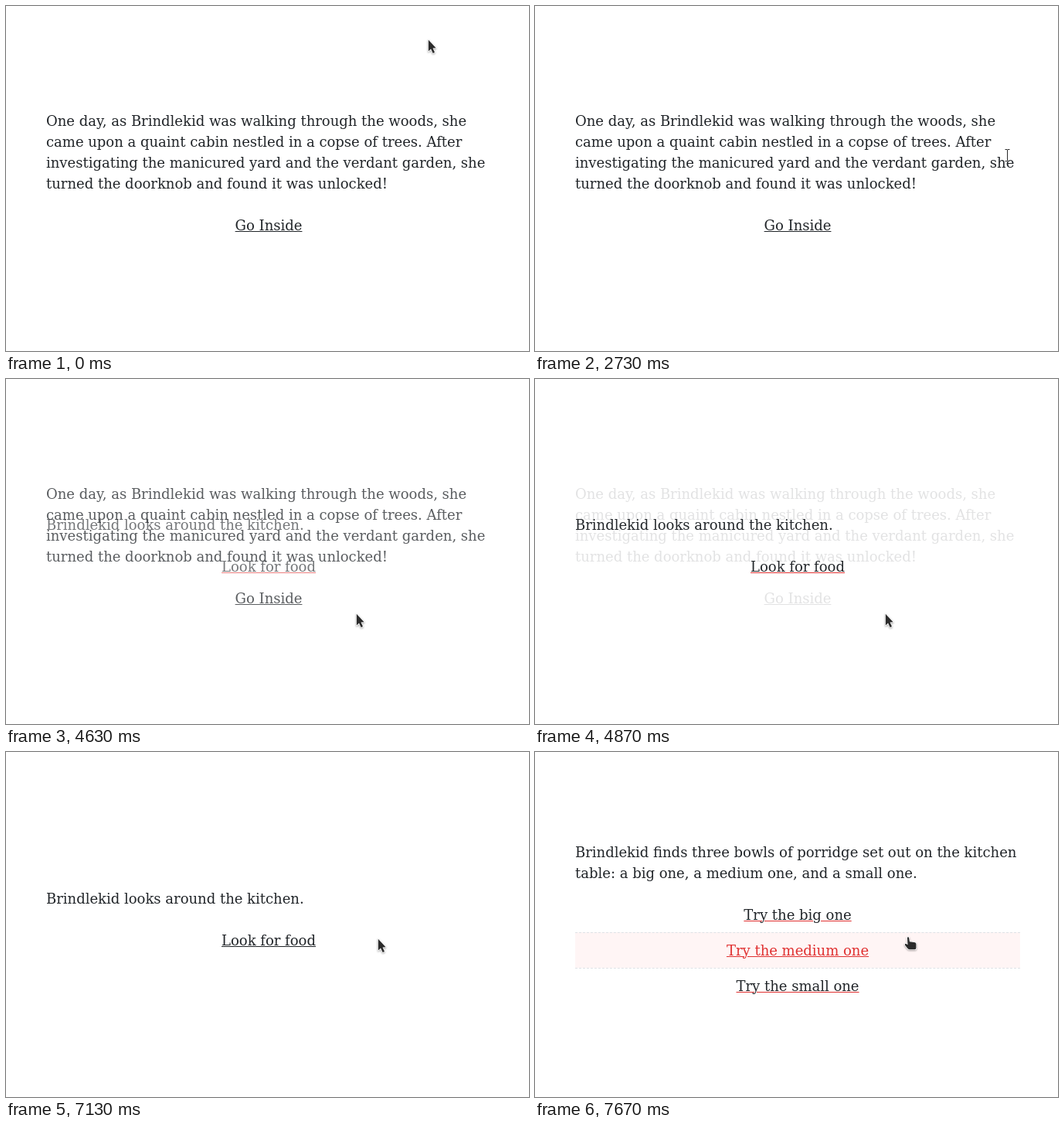
These frames come from a looping animation (677 by 446 pixels, 8000 ms). An HTML page:

```html
<!DOCTYPE html>
<html lang="en">
<head>
<meta charset="utf-8">
<title>Brindlekid</title>
<style>
  html, body { margin: 0; width: 100%; height: 100%; overflow: hidden; background: #fff; }
  body { position: relative; font: 18px/27px "DejaVu Serif", serif; color: #212529; cursor: none; }
  .page { position: absolute; left: 52px; width: 576px; white-space: pre; }
  .page p { margin: 0 0 18px; }
  .link { padding: 9px 0; text-align: center; }
  .link + .link { border-top: 1px dashed #dee2e6; }
  .link span { text-decoration: underline 1px #e03131; }
  #door { top: 135px; }
  #kitchen { top: 175px; opacity: 0; }
  #bowls { top: 116px; opacity: 0; }
  #mouse { position: absolute; left: 0; top: 0; width: 1px; height: 1px; }
  #mouse svg { position: absolute; left: -20px; top: -20px; width: 50px; height: 50px; }
  #arrow, #hand { filter: drop-shadow(0 1px 1px rgba(0, 0, 0, .35)); }
  #mouse path { fill: #2b2b2b; stroke: #fff; stroke-width: 1.6; paint-order: stroke; stroke-linejoin: round; }
</style>
</head>
<body>
<div class="page" id="door"><p>One day, as Brindlekid was walking through the woods, she
came upon a quaint cabin nestled in a copse of trees. After
investigating the manicured yard and the verdant garden, she
turned the doorknob and found it was unlocked!</p><div class="link" id="inside"><span>Go Inside</span></div></div>

<div class="page" id="kitchen"><p>Brindlekid looks around the kitchen.</p><div class="link" id="food"><span>Look for food</span></div></div>

<div class="page" id="bowls"><p>Brindlekid finds three bowls of porridge set out on the kitchen
table: a big one, a medium one, and a small one.</p><div class="link"><span>Try the big one</span></div><div class="link" id="medium"><span>Try the medium one</span></div><div class="link"><span>Try the small one</span></div></div>

<div id="mouse">
  <svg id="arrow" viewBox="-20 -20 50 50"><path d="M.8 .8V15.6L4 12.6L6.6 18L9 16.9L6.5 11.6L10.6 11.2Z"/></svg>
  <svg id="beam" viewBox="-20 -20 50 50"><path style="stroke-width:1" d="M-2.5 -8H0V-7.5H1V-8H3.5V-7H1V7H3.5V8H1V7.5H0V8H-2.5V7H0V-7H-2.5Z"/></svg>
  <svg id="hand" viewBox="-20 -20 50 50"><path d="M.9 -1.2Q2 -2.2 3 -1.2L3.9 4.2L9.6 5Q12.4 5.3 12.4 7.6V12.2Q12.4 14.2 10.6 14.2H3.6Q2.2 14.2 1.2 12.8L-2.2 8.4Q-2.4 6.6 -.6 6.9L1.5 8.2Z"/></svg>
</div>

<script>
const LOOP = 8000;
const INK = '#212529', RED = '#e03131', PALE = '#fff5f5';
const HOLD = 'step-end';
const $ = id => document.getElementById(id);
const begin = document.timeline.currentTime || 0;

// rows: [ms, style, easing towards the next row]
function play(el, rows) {
  const frames = rows.map(([ms, style, easing = HOLD]) => ({ ...style, offset: ms / LOOP, easing }));
  frames.push({ ...rows[rows.length - 1][1], offset: 1 });
  el.animate(frames, { duration: LOOP, iterations: Infinity }).startTime = begin;
}

const fade = (id, rows) => play($(id), rows.map(([ms, opacity, easing]) => [ms, { opacity }, easing]));

// states: [ms, hovered, line colour at rest]
function hover(id, states) {
  const box = $(id);
  play(box, states.map(([ms, on]) => [ms, { backgroundColor: on ? PALE : 'rgba(255,245,245,0)' }]));
  play(box.firstChild, states.map(([ms, on, line]) =>
    [ms, { color: on ? RED : INK, textDecorationColor: on ? RED : line }]));
}

fade('door', [[0, 1], [4410, 1, 'ease-in'], [4910, 0]]);
fade('kitchen', [[0, 0], [4410, 0, 'ease-out'], [4910, 1], [7140, 1, 'ease-in'], [7640, 0]]);
fade('bowls', [[0, 0], [7140, 0, 'ease-out'], [7640, 1]]);
play($('kitchen'), [[0, { top: '175px' }], [7130, { top: '176px' }]]);

hover('inside', [[0, 0, INK], [3385, 1], [4330, 0, INK]]);
hover('food', [[0, 0, RED], [6392, 1], [7130, 0, INK]]);
hover('medium', [[0, 0, RED], [7670, 1]]);

const path = [
  [0, 546, 43],
  [800, 546, 43, 'ease-in-out'], [1170, 542, 117],
  [1430, 542, 117, 'ease-out'], [1570, 538, 166],
  [2230, 538, 166, 'ease-in-out'], [2430, 631, 191],
  [2670, 631, 191, 'linear'], [2730, 611, 193],
  [3000, 611, 193, 'ease-in-out'], [3670, 453, 303],
  [6200, 457, 292],
  [6300, 457, 292, 'linear'], [6470, 481, 241]
];
play($('mouse'), path.map(([ms, x, y, easing]) => [ms, { transform: `translate(${x}px, ${y}px)` }, easing]));

const shapes = [
  [0, 'arrow'], [1560, 'beam'], [2335, 'arrow'], [2720, 'beam'], [3210, 'arrow'], [3385, 'hand'],
  [4330, 'arrow'], [6392, 'hand'], [7130, 'arrow'], [7670, 'hand']
];
for (const id of ['arrow', 'beam', 'hand'])
  fade(id, shapes.map(([ms, shape]) => [ms, shape === id ? 1 : 0]));
</script>
</body>
</html>
```
